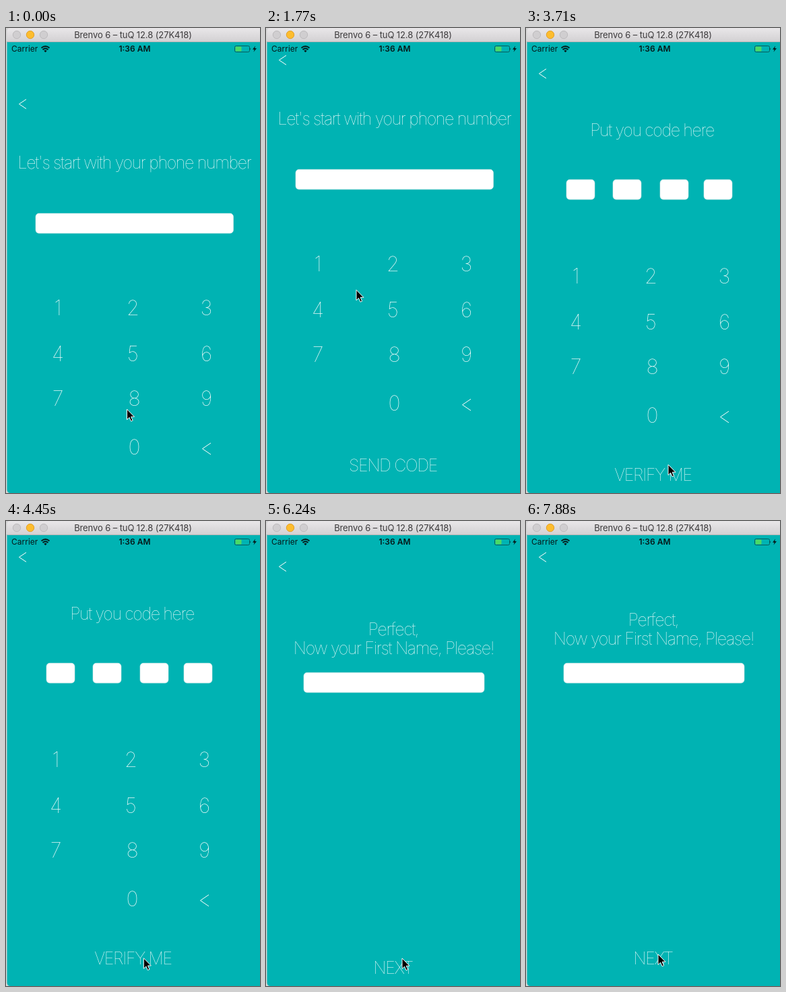
Write an HTML page that moves like this. It is 377x688 px and loops after 8000 ms.

```html
<!DOCTYPE html>
<html lang="en">
<head>
<meta charset="utf-8">
<style>
  html, body { margin: 0; width: 100%; height: 100%; overflow: hidden; background: #d4d4d4; }
  svg { display: block; font-family: Inter, "Open Sans", sans-serif; font-optical-sizing: none; }
  text { text-anchor: middle; }
  .screen text { font-size: 25px; font-weight: 100; letter-spacing: -1.35px; fill: #fff; }
  .screen .key { font-size: 30.5px; letter-spacing: 0; }
  .screen path { fill: none; stroke: #fff; }
  .screen rect { fill: #fff; stroke: #d5e6e6; stroke-width: .6; }
</style>
</head>
<body>
<svg width="377" height="688" viewBox="0 0 377 688">
  <defs>
    <linearGradient id="bar" x2="0" y2="1">
      <stop stop-color="#e9e7e9"/><stop offset="1" stop-color="#d3d1d3"/>
    </linearGradient>
  </defs>
  <path d="M1.5 20H377V688H6.5Q1.500 688 1.500 683Z" fill="#00b3b3"/>
  <g id="stage"></g>

  <path d="M1.500 20V5Q1.500 0 6.500 0H377V20Z" fill="url(#bar)"/>
  <path d="M1.500 20.500H377" stroke="#aeb5b5"/>
  <g fill="#d0ced0" stroke="#bdbbbd">
    <circle cx="16" cy="10" r="5.700"/>
    <circle cx="36" cy="10" r="5.700" fill="#fdbd2e" stroke="#e2a028"/>
    <circle cx="56" cy="10" r="5.700"/>
  </g>
  <text x="188.500" y="14.700" font-size="13" letter-spacing="-.1" fill="#3c3a3c">Brenvo 6 – tuQ 12.8 (27K418)</text>

  <g fill="#06191a">
    <text x="27.700" y="35.300" font-size="12">Carrier</text>
    <text x="191" y="35.300" font-size="12" font-weight="600">1:36 AM</text>
    <path d="M52.500 29.500Q58.500 24.500 64.500 29.500M54.500 32Q58.500 28.500 62.500 32" fill="none" stroke="#06191a" stroke-width="1.700"/>
    <path d="M56.300 33.700Q58.500 32 60.700 33.700L58.500 36Z"/>
    <rect x="339.500" y="26.500" width="22" height="9" rx="2" fill="none" stroke="#075c5c"/>
    <rect x="340.500" y="27.500" width="9" height="7" rx="1" fill="#4cd964"/>
    <path d="M362.500 29.500Q364 31 362.500 32.500Z"/>
    <path d="M370 26.500L366 31.700H368.700L367.500 35.500L372 30H369.200Z"/>
  </g>

  <path id="cursor" d="M0 0V15.500L3.600 12.200L6 17.800L8.600 16.700L6.200 11.200H11Z" stroke="#fff"/>
</svg>
<script>
const $ = id => document.getElementById(id);
const label = (x, y, s, cls = '') => `<text x="${x}" y="${y}" class="${cls}">${s}</text>`;
const field = (x, y, w) => `<rect x="${x}" y="${y}" width="${w}" height="29.500" rx="5"/>`;
const chevron = (x, y, w, h) => `<path d="M${x + w} ${y - h}L${x} ${y}L${x + w} ${y + h}"/>`;
const back = y => chevron(19.5, y, 10.5, 7);
const button = s => label(188.5, 656, s, 'button');

const baselines = [360, 428, 494, 566];
const keypad = (dx, dy) => {
  const keys = [...'1234567890'].map((digit, i) => {
    const row = Math.floor(i / 3), col = digit === '0' ? 1 : i % 3;
    const x = [77, row < 2 ? 188.5 : 190.5, 297.5][col];
    return label(x, baselines[row], digit, 'key');
  });
  return `<g transform="translate(${dx} ${dy})">${keys.join('')}${chevron(291.5, 557.5, 12.5, 8.5)}</g>`;
};

const screens = [
  back(47.5) + label(190.5, 143, "Let's start with your phone number") +
    field(44, 209.3, 293.5) + keypad(0, 0) + button('SEND CODE'),
  back(53.5) + label(187, 146, 'Put you code here') +
    [60, 129, 199, 264].map(x => field(x, 210.3, 42)).join('') + keypad(-3, 4) + button('VERIFY ME'),
  back(53.5) + label(189, 155, 'Perfect,') + label(189.5, 183, 'Now your First Name, Please!') +
    field(56, 210.3, 268) + button('NEXT')
];
$('stage').innerHTML = screens.map(s => `<g class="screen">${s}</g>`).join('');
const groups = [...document.querySelectorAll('.screen')];

// All motion is sampled in ticks of 148 ms
const LOOP = 8000, TICK = 148, LEAD = 10;
const entries = [0, 24.2, 41.2]; // when each screen slides in
const taps = [22, 40];           // when each button is pressed
const moves = [                  // pointer: start tick, length, x, y
  [3, 5, 141, 367], [11, 1, 134, 387.5], [12, 1, 196, 566], [14, 3, 211, 646],
  [28, 3, 202, 647], [45, 2, 186, 541], [47, 2, 196, 622], [50, 3, 196, 641]
];

const slide = n => Math.round(65 * Math.exp(-1.9 * n));
const ease = p => p * p * (3 - 2 * p);
const clamp = p => Math.min(1, Math.max(0, p));

function pointerAt(tick) {
  return moves.reduce(([px, py], [start, length, x, y]) => {
    const p = ease(clamp((tick - start) / length));
    return [px + (x - px) * p, py + (y - py) * p];
  }, [179.5, 564]);
}

function draw() {
  const tick = Math.floor((performance.now() % LOOP + LEAD) / TICK);
  const current = entries.findLastIndex(entry => tick >= Math.floor(entry));
  const screen = groups[current];
  groups.forEach(g => g.style.display = g === screen ? '' : 'none');
  screen.setAttribute('transform', `translate(0 ${slide(tick - entries[current])})`);
  screen.querySelector('.button').setAttribute('opacity', tick >= taps[current] ? .2 : 1);
  $('cursor').setAttribute('transform', `translate(${pointerAt(tick)})`);
  requestAnimationFrame(draw);
}
draw();
</script>
</body>
</html>
```
